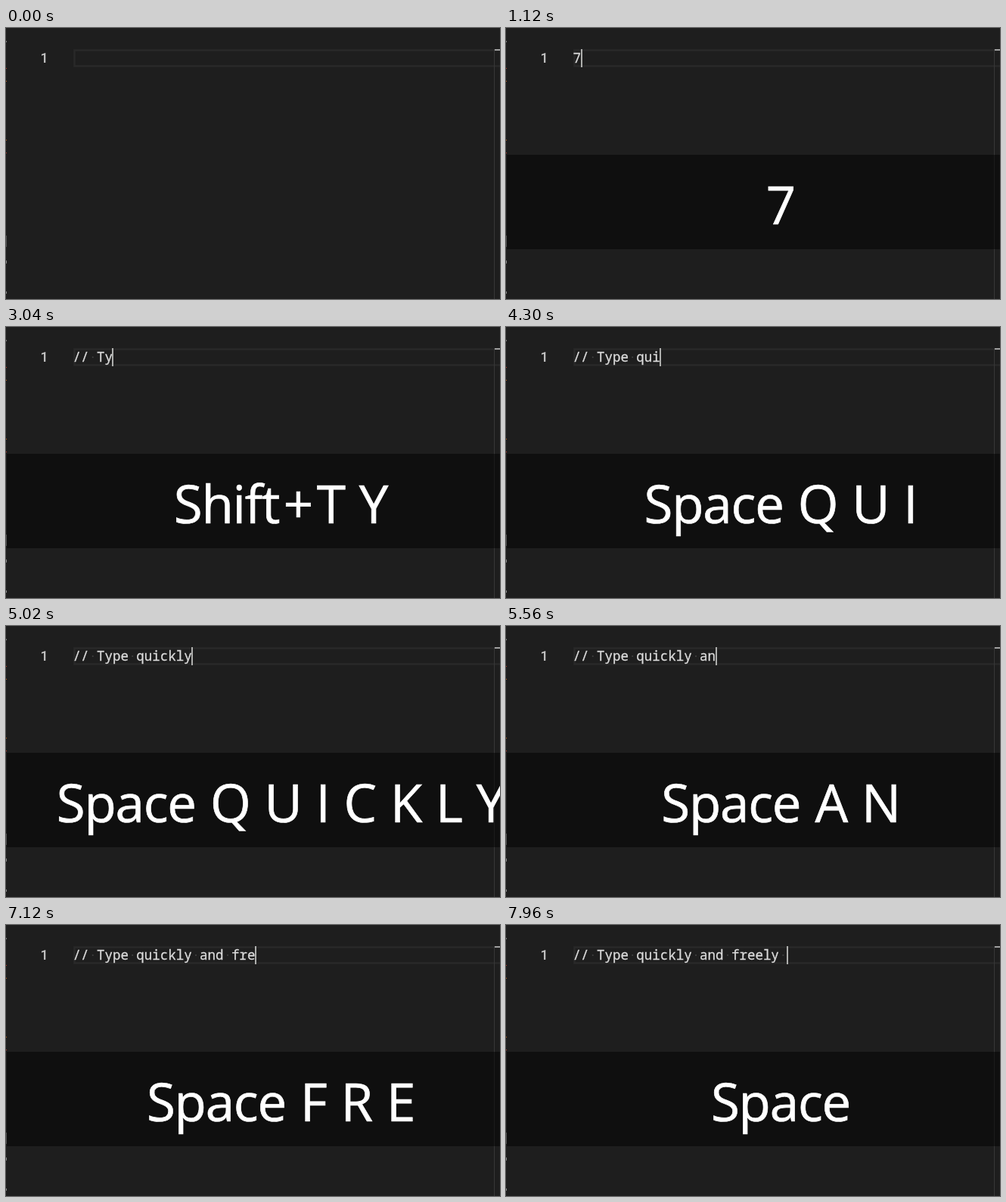
Animation, 653 px wide and 359 px high, one loop 8000 ms. Source, as an HTML page:

```html
<!DOCTYPE html>
<html lang="en">
<head>
<meta charset="utf-8">
<title>Typing with a key display</title>
<style>
  html, body { margin: 0; width: 100%; height: 100%; overflow: hidden; background: #1e1e1e; }
  svg { display: block; width: 653px; height: 359px; }
  text { white-space: pre; font-variant-ligatures: none; }
  .code { font: 17.47px "Noto Sans Mono", "DejaVu Sans Mono", monospace; fill: #dcdcdc; stroke: #dcdcdc; stroke-width: .3px; }
  .number { font: 500 18px Roboto, sans-serif; fill: #c6c6c6; text-anchor: middle; }
  .keys {
    font: 69px "Open Sans", "Noto Sans", sans-serif;
    letter-spacing: -1.2px; word-spacing: 2.3px; text-anchor: middle;
    fill: #fff; stroke: #fff; stroke-width: .7px;
  }
</style>
</head>
<body>
<svg viewBox="0 0 653 359">
  <rect width="653" height="359" fill="#1e1e1e"/>
  <g id="edge"></g>
  <rect x="90.5" y="29.5" width="580" height="21" fill="none" stroke="#292929" stroke-width="2.5"/>
  <path d="M645.5 28V359" stroke="#373737"/>
  <rect x="646" y="28" width="7" height="2" fill="#a0a0a0"/>
  <text class="number" x="50.5" y="46">1</text>
  <g id="dots" fill="#404040"></g>
  <text class="code" id="code" y="46"></text>
  <rect id="cursor" y="28" width="2" height="24" fill="#aeafad"/>
  <g id="panel">
    <rect x="1" y="168" width="652" height="125" fill="#000" fill-opacity=".5"/>
    <text class="keys" id="keys" x="363" y="259.5"></text>
  </g>
</svg>
<script>
const LOOP = 8000, LEFT = 88.57, CELL = 10.482;
const LINE = "// Type quickly and freely ";

// [start ms, typed text, pressed keys]
const steps = [
  [0, "", ""],
  [1120, "7", "7"],
  [1660, "/", "7 7"],
  [1720, "/", "7 7 7"],
  [2080, "/7", "7 7 7 7"],
  [2140, "//", "7 7 7 7"],
  [2260, "// ", "Space"],
  [2620, "// ", "Shift"]
];

// Each word adds one character and one key per time given.
function addWord(times, first, from) {
  let keys = first;
  times.forEach((time, i) => {
    const end = from + i + 1;
    if (i) keys += " " + LINE[end - 1].toUpperCase();
    steps.push([time, LINE.slice(0, end), keys]);
  });
}
// Hair spaces set the plus sign apart.
addWord([2800, 3040, 3220, 3640], "Shift\u200a+\u200aT", 3);
addWord([3760, 4000, 4120, 4300, 4420, 4660, 4840, 5020], "Space", 7);
addWord([5320, 5440, 5560, 5920], "Space", 15);
addWord([6040, 6520, 6820, 7060, 7140, 7240, 7660], "Space", 19);
addWord([7960], "Space", 26);

const $ = id => document.getElementById(id);
function add(parent, tag, attrs) {
  const node = document.createElementNS("http://www.w3.org/2000/svg", tag);
  for (const name in attrs) node.setAttribute(name, attrs[name]);
  parent.append(node);
  return node;
}

// Slivers of the sidebar icons at the left edge: y, height, colour
[[17, 2, "#777"], [53, 1, "#c0392b"], [70, 1, "#c8641c"], [148, 1, "#c8641c"],
 [165, 1, "#c0392b"], [275, 15, "#555"], [308, 4, "#888"], [349, 3, "#888"]]
  .forEach(([y, height, fill]) => add($("edge"), "rect", { x: 0, y, width: 1, height, fill }));

const dots = [...LINE].flatMap((char, i) => char === " "
  ? [{ i, node: add($("dots"), "circle", { cx: LEFT + (i + .5) * CELL, cy: 40, r: 1.1 }) }]
  : []);

const show = (node, on) => node.setAttribute("visibility", on ? "visible" : "hidden");
$("code").setAttribute("x", LEFT);
let last = "";

function draw(now) {
  const time = now % LOOP;
  const [, text, keys] = steps.findLast(step => step[0] <= time);
  const lit = time >= 1120 || (time >= 100 && time < 700);
  const state = text + "|" + keys + lit;
  if (state !== last) {
    last = state;
    $("code").textContent = text;
    $("keys").textContent = keys;
    $("cursor").setAttribute("x", Math.floor(LEFT + text.length * CELL));
    show($("cursor"), lit);
    show($("panel"), keys);
    dots.forEach(dot => show(dot.node, dot.i < text.length));
  }
}

const start = performance.now();
function tick() {
  draw(performance.now() - start);
  requestAnimationFrame(tick);
}
tick();
</script>
</body>
</html>
```
